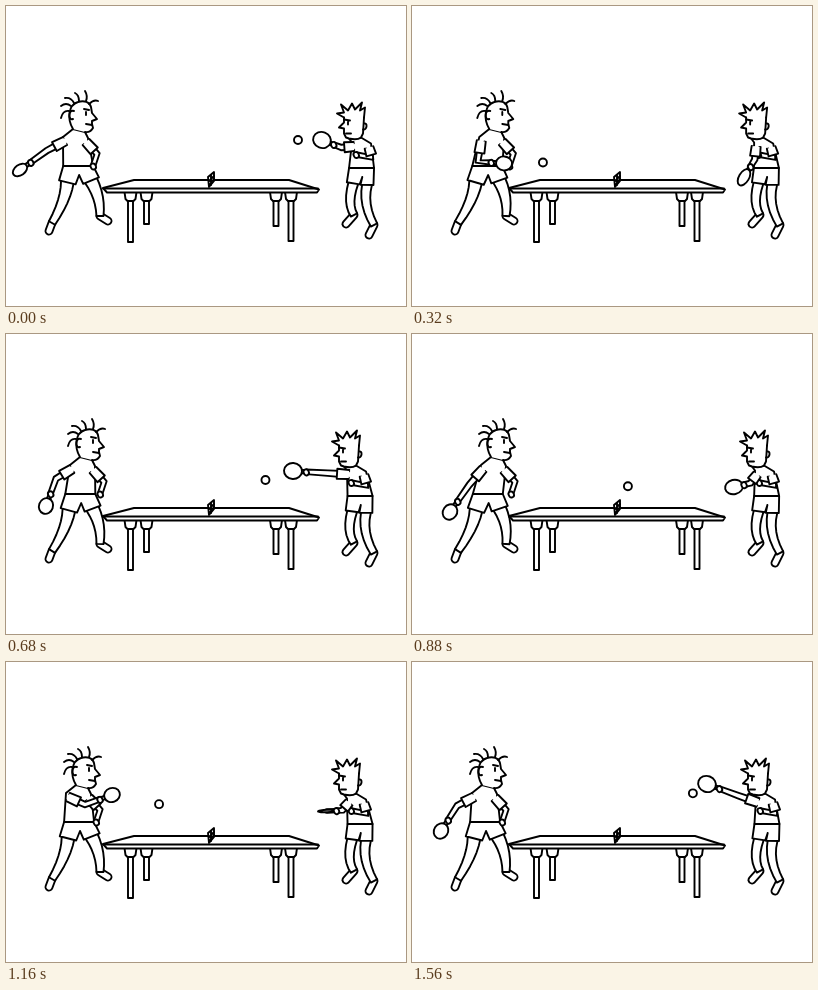
Recreate the animation shown at these times as an HTML page with a canvas. Size 400 by 300 pixels, loop 1600 ms.

```html
<!DOCTYPE html>
<html>
<head>
<meta charset="utf-8">
<style>
html, body { margin: 0; width: 100%; height: 100%; overflow: hidden; background: #fff; }
canvas { display: block; }
</style>
</head>
<body>
<canvas id="stage" width="400" height="300"></canvas>
<script>
const ctx = document.getElementById('stage').getContext('2d');
const LOOP = 1600, STEP = 40, LINE = 1.9;
const poseTimes = [0, 200, 480, 680, 880, 1160, 1560];

// Each pose: head x, paddle x and y, how far the paddle faces us (default 1)
const left = {
  poses: [[75, 14, 164, .75], [87, 92, 163], [83, 92, 150], [82, 40, 172],
    [87, 38, 178], [78, 106, 133], [78, 29, 169]],
  home: 81, headY: 109, radius: 8, elbowOut: .7,
  shoulder: [-18, 22], shoulders: 25, waist: [59, 160], hips: 30, neck: [[-8, 14], [4, 17]],
  freeElbow: [9, 16], freeHand: [5, 28],
  ankles: [[46, 217], [94, 210]], bends: [[2, 3], [4, 3]], toes: [[-3, 8], [8, 5]], thigh: 8.5,
  face: 'M-8 14C-14 4-13-10-3-13C3-15 9-13 10-8L11-2 16 4 11 6 11 9 12 13Q9 18 4 17',
  lines: 'M-7-4C-13-6-13 6-8 4M3-6L8-5M5-3V0M5 9L11 10' +
    'M-12-4Q-18-5-20 3M-10-9Q-15-13-20-9M-7-12Q-10-18-16-17M-2-14Q-2-20-6-22M5-14Q7-19 4-24M8-11Q13-16 17-14'
};
const right = {
  poses: [[347, 316, 134], [344, 329, 170, .8], [342, 336, 173, .4], [342, 287, 137],
    [344, 322, 153, .9], [342, 321, 149, .15], [345, 295, 122]],
  home: 343.5, headY: 119.5, radius: 9, elbowOut: -.15,
  shoulder: [-1, 17], shoulders: 19, waist: [342, 162], hips: 25, neck: [[-4, 13], [8, 12]],
  freeElbow: [1, 14], freeHand: [-15, 11],
  ankles: [[348, 209], [368, 219]], bends: [[-4, 6], [-4, 4]], toes: [[-8, 9], [-5, 10]], thigh: 6.5,
  face: 'M-9-8L-9-3-14 2-9 3-9 8-7 12-4 13Q4 15 8 12L10 8 11-8',
  lines: 'M-9-6L-3-5M-5-4V-1M-7 8L-2 8M11-2C15-3 14 5 10 4' +
    'M-9-8L-16-12-9-13-12-21-5-15-1-22 2-16 9-23 7-15 12-18 11-8'
};

// Moments when the ball is struck: time, x, y
const hits = [[0, 292, 134], [290, 112, 156], [780, 289, 138], [1080, 113, 138], [1600, 292, 130]];
const TABLE_Y = 173, BOUNCE_AT = .65;

const mix = (a, b, k) => a + (b - a) * k;
const mixPoint = (p, q, k) => [mix(p[0], q[0], k), mix(p[1], q[1], k)];
const add = (p, q) => [p[0] + q[0], p[1] + q[1]];
const distance = (p, q) => Math.hypot(q[0] - p[0], q[1] - p[1]);

function paint(path) {
  ctx.fill(path);
  ctx.stroke(path);
}

function shape(points, closed = true) {
  const path = new Path2D();
  points.forEach(p => path.lineTo(...p));
  if (closed) path.closePath();
  paint(path);
}

function oval([x, y], rx, ry = rx, turn = 0) {
  const path = new Path2D();
  path.ellipse(x, y, rx, ry, turn, 0, Math.PI * 2);
  paint(path);
}

// Both outlines of a limb that tapers along its points
function edges(points, from, to = from) {
  const last = points.length - 1;
  return [1, -1].map(sign => points.map((p, i) => {
    const a = points[Math.max(0, i - 1)], b = points[Math.min(last, i + 1)];
    const r = sign * mix(from, to, i / last) / (distance(a, b) || 1);
    return [p[0] - (b[1] - a[1]) * r, p[1] + (b[0] - a[0]) * r];
  }));
}

function tube(points, from, to) {
  const [a, b] = edges(points, from, to);
  shape([...a, ...b.reverse()], false);
}

function capsule(a, b, width) {
  const path = new Path2D();
  path.moveTo(...a);
  path.lineTo(...b);
  ctx.save();
  ctx.lineWidth = width + LINE;
  ctx.stroke(path);
  ctx.lineWidth = width - LINE;
  ctx.strokeStyle = '#fff';
  ctx.stroke(path);
  ctx.restore();
}

function curve(a, b, c) {
  return Array.from({ length: 7 }, (_, i) =>
    mixPoint(mixPoint(a, b, i / 6), mixPoint(b, c, i / 6), i / 6));
}

function arm(shoulder, elbow, hand) {
  const sleeve = Math.min(.75, 12 / distance(shoulder, elbow));
  tube([shoulder, elbow, hand], 3.2, 2.3);
  capsule(hand, add(hand, [.5, 1]), 5);
  tube([shoulder, mixPoint(shoulder, elbow, sleeve)], 4.5, 5);
}

function poseAt(poses, t) {
  const i = poseTimes.findLastIndex(start => start <= t);
  const start = poseTimes[i], end = poseTimes[i + 1] ?? LOOP;
  const a = poses[i], b = poses[(i + 1) % poses.length];
  return [0, 1, 2, 3].map(n => mix(a[n] ?? 1, b[n] ?? 1, (t - start) / (end - start)));
}

function legs(p, waist, waist2) {
  const hems = p.ankles.map((ankle, i) => {
    const hip = mixPoint(waist, waist2, i ? .73 : .27);
    const knee = add(mixPoint(hip, ankle, .5), p.bends[i]);
    const hem = mixPoint(hip, knee, .52);
    capsule(ankle, add(ankle, p.toes[i]), 7);
    tube(curve(hem, add(knee, p.bends[i]), ankle), p.thigh * .75, 3.5);
    return edges([hip, hem], p.thigh).map(side => side[1]);
  });
  const crotch = add(mixPoint(waist, waist2, .53), [0, 9]);
  shape([waist, ...hems[0], crotch, ...hems[1], waist2]);
}

function paddleArm(p, shoulder, paddle, facing) {
  const dx = paddle[0] - shoulder[0], dy = paddle[1] - shoulder[1];
  const reach = Math.hypot(dx, dy);
  const out = Math.max(0, 56 - reach) * p.elbowOut / reach;
  const elbow = add(mixPoint(shoulder, paddle, .38), [-dy * out, dx * out]);
  const hand = mixPoint(paddle, elbow, Math.min(.6, 13 / distance(paddle, elbow)));
  const angle = Math.atan2(paddle[1] - hand[1], paddle[0] - hand[0]);
  capsule(hand, paddle, 3.4);
  oval(paddle, p.radius, (p.radius - 1) * facing, angle);
  arm(shoulder, elbow, hand);
}

function player(p, t) {
  const [headX, paddleX, paddleY, facing] = poseAt(p.poses, t);
  const head = [headX, p.headY];
  const shoulder = add(head, p.shoulder);
  const shoulder2 = add(shoulder, [p.shoulders, 1]);
  const waist = add(p.waist, [(headX - p.home) * .3, 0]);
  const waist2 = add(waist, [p.hips, 0]);
  const neck = p.neck.map(n => add(head, n));

  legs(p, waist, waist2);
  shape([shoulder, ...neck, shoulder2, waist2, waist]);
  arm(add(shoulder2, [-2, 4]), add(shoulder2, p.freeElbow), add(shoulder2, p.freeHand));

  ctx.save();
  ctx.translate(...head);
  paint(new Path2D(p.face));
  ctx.stroke(new Path2D(p.lines));
  ctx.restore();

  paddleArm(p, add(shoulder, [2, 4]), [paddleX, paddleY], facing);
}

function table() {
  for (const [x, foot] of [[140.5, 218], [270, 220], [124.5, 236], [285, 235]]) {
    shape([[x - 2.5, 193], [x - 2.5, foot], [x + 2.5, foot], [x + 2.5, 193]]);
    shape([[x - 6, 186], [x - 5, 193], [x - 3, 195], [x + 3, 195], [x + 5, 193], [x + 6, 186]]);
  }
  shape([[97, 182], [101, 186.5], [311, 186.5], [313, 183.5], [283, 174], [128, 174]]);
  ctx.stroke(new Path2D('M97 182.5H312'));
  shape([[202, 171], [208, 166], [208, 175], [203, 181]]);
  ctx.stroke(new Path2D('M203 175L208 170M203 179L208 173M205 169V179'));
}

// The ball slows in flight, falls to the table and rises to the next hit
function drawBall(t) {
  const i = hits.findIndex(hit => hit[0] > t);
  const [start, x, y] = hits[i - 1], [end, x2, y2] = hits[i];
  const s = ((t - start) / (end - start)) ** .8;
  const rest = (1 - s) / (1 - BOUNCE_AT);
  const height = s < BOUNCE_AT
    ? mix(y, TABLE_Y, (s / BOUNCE_AT) ** 2)
    : mix(y2, TABLE_Y, rest ** 2);
  oval([mix(x, x2, s), height], 4);
}

function draw(now) {
  const t = Math.floor(now % LOOP / STEP) * STEP;
  ctx.fillStyle = '#fff';
  ctx.fillRect(0, 0, 400, 300);
  ctx.strokeStyle = '#000';
  ctx.lineWidth = LINE;
  ctx.lineJoin = ctx.lineCap = 'round';
  player(left, t);
  player(right, t);
  table();
  drawBall(t);
}

const begin = performance.now();
function frame() {
  draw(performance.now() - begin);
  requestAnimationFrame(frame);
}
frame();
</script>
</body>
</html>
```
